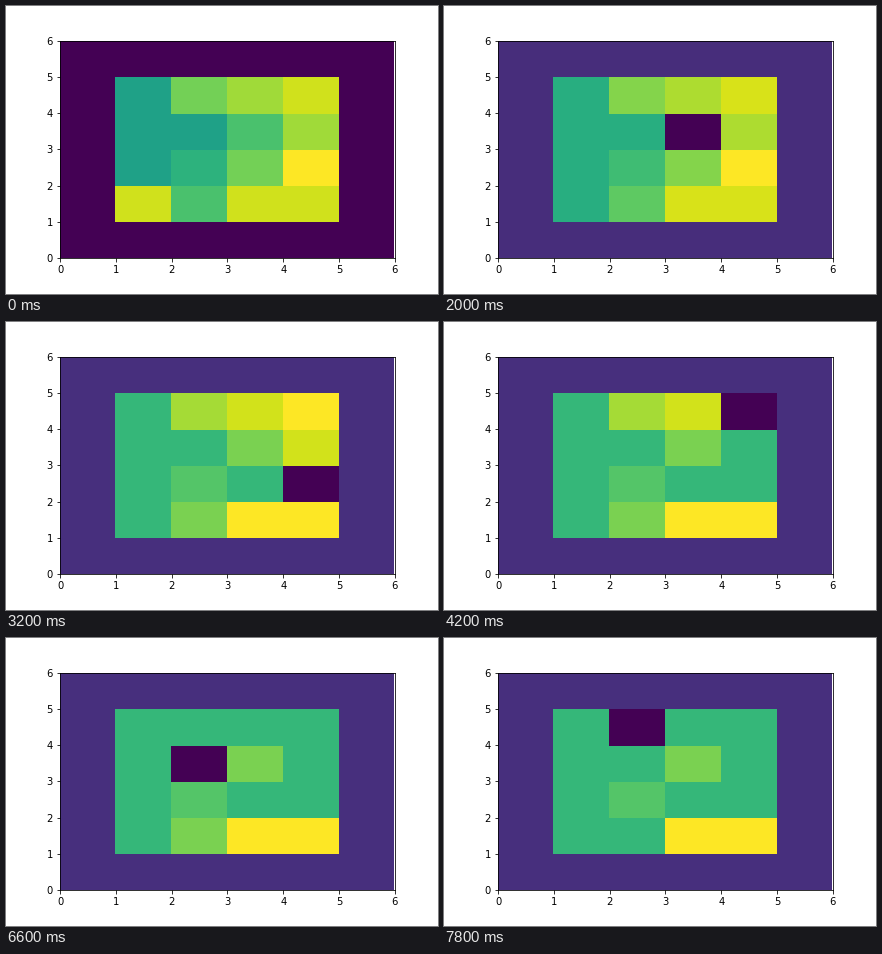
A matplotlib script that plays this animation: 432 px wide and 288 px high, repeating every 8000 ms.

```python
import numpy as np
import matplotlib.pyplot as plt
from matplotlib.animation import FuncAnimation
from matplotlib.transforms import Affine2D

STEP = 200   # ms per frame
FRAMES = 40
CLEAN, ROBOT = 4, -1

MOVES = {"U": (0, 1), "D": (0, -1), "L": (-1, 0), "R": (1, 0)}
ROUTE = "UURRDDRUUULLDDDUUU"
# Frames spent cleaning after this many moves.
PAUSES = {0: 3, 1: 2, 5: 2, 8: 1, 9: 2, 10: 7, 11: 1, 12: 1, 15: 1}


def make_room():
    """Clean floor plus dirt in half steps, bottom row first, walls at 0."""
    c = np.arange(4)
    dirt = np.array([
        5 - 3 * (c == 1),
        c * (c + 1) // 2,
        2 * np.maximum(c - 1, 0),
        (c + 2) * (c > 0),
    ])
    return np.pad(CLEAN + dirt / 2, 1)


def simulate():
    """One grid per frame: the empty room, then the robot on its route."""
    room = make_room()
    grids = [room.copy()]
    col, row = 1, 1
    for i in range(len(ROUTE) + 1):
        if i:
            dx, dy = MOVES[ROUTE[i - 1]]
            col, row = col + dx, row + dy
        pause = PAUSES.get(i, 0)
        shown = room.copy()
        shown[row, col] = ROBOT
        grids += [shown] * (1 + pause)
        if pause:
            room[row, col] = CLEAN
    return grids


plt.rcParams["font.family"] = "DejaVu Sans"
fig, ax = plt.subplots(figsize=(6, 4), dpi=72)
fig.subplots_adjust(left=0.125, right=0.9, bottom=0.125, top=0.88)

grids = simulate()
mesh = ax.pcolormesh(grids[0], cmap="viridis")
ax.set_xlim(0, 6)
ax.set_ylim(0, 6)
# Nudge the cells so their edges round down to whole pixels.
mesh.set_transform(ax.transData + Affine2D().translate(-0.48, -0.48))


def draw(frame):
    grid = grids[frame]
    mesh.set_array(grid)
    mesh.set_clim(grid.min(), grid.max())
    return [mesh]


anim = FuncAnimation(fig, draw, frames=FRAMES, interval=STEP,
                     repeat=True, repeat_delay=0, blit=False)
plt.show()
```
